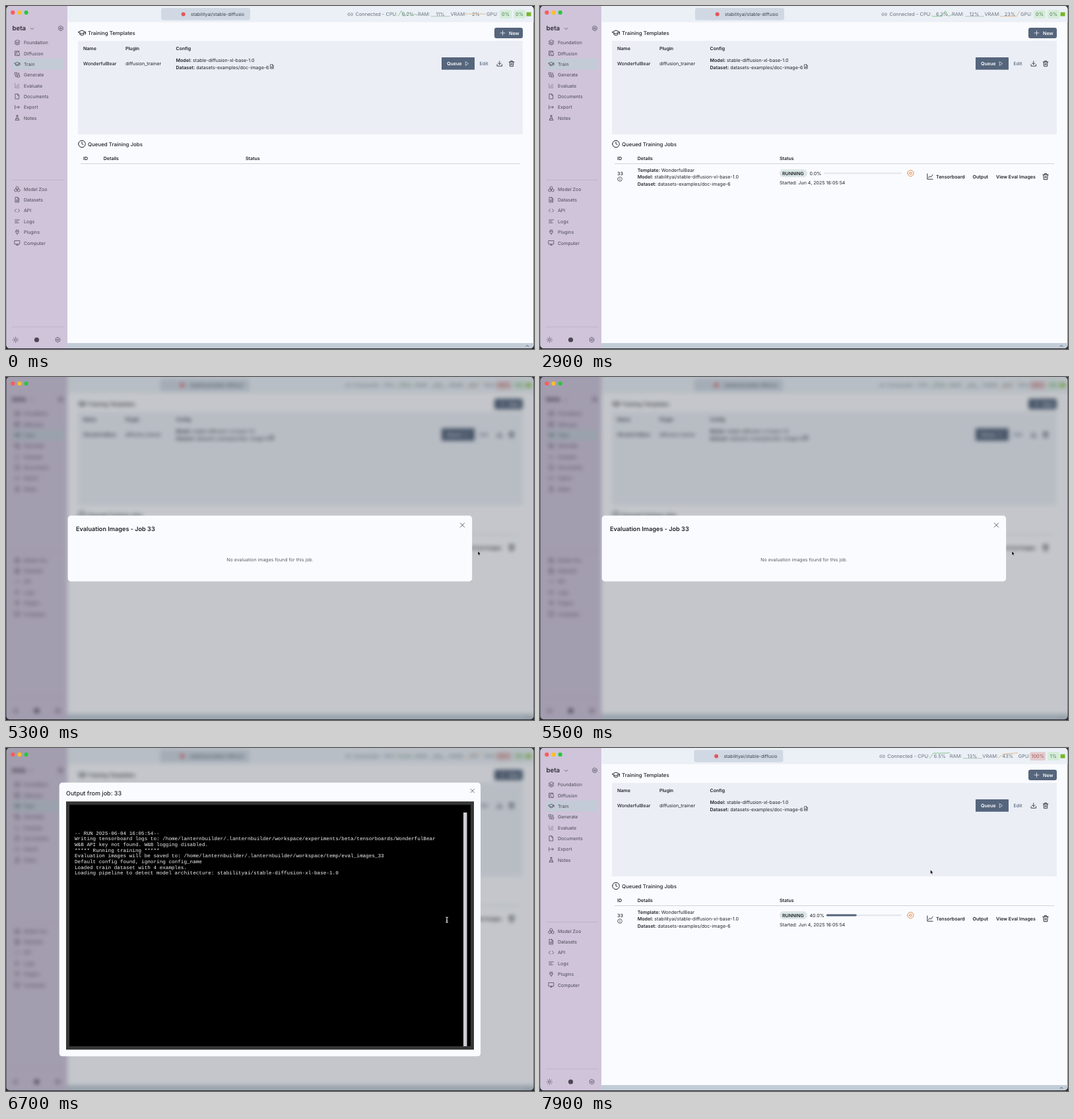
Write an HTML page that moves like this. It is 800 px wide and 521 px high and loops after 8 s.

```html
<!DOCTYPE html>
<html lang="en">
<head>
<meta charset="utf-8">
<style>
html, body { margin: 0; width: 100%; height: 100%; overflow: hidden; background: #2b2d31; }
svg { display: block; width: 100vw; height: 100vh; }
text { font-family: Inter, "Open Sans", sans-serif; white-space: pre; text-rendering: geometricPrecision; }
.mono { font-family: "Liberation Mono", monospace; }
.blur { filter: blur(3.1px); }
</style>
</head>
<body>
<svg id="stage" viewBox="0 0 800 521" xmlns="http://www.w3.org/2000/svg"></svg>
<script>
const INK = '#1f2328', SIDE = '#4b4754', SLATE = '#55657c', GREY = '#69717c', PAPER = '#fafbfe';

// y is the vertical middle of the capitals; *word* is semibold
const text = (x, y, s, { size = 7.1, weight = 400, fill = INK, more = '' } = {}) =>
  `<text x="${x}" y="${y + size * .36}" font-size="${size}" font-weight="${weight}" fill="${fill}" ${more}>` +
  s.replace(/\*(.+?)\*/g, '<tspan font-weight="600">$1</tspan>') + '</text>';
const rect = (x, y, w, h, fill, r = 0) =>
  `<rect x="${x}" y="${y}" width="${w}" height="${h}" rx="${r}" fill="${fill}"/>`;
const dot = (x, y, r, fill) => `<circle cx="${x}" cy="${y}" r="${r}" fill="${fill}"/>`;
const line = (x1, x2, y, color) => `<path d="M${x1} ${y}H${x2}" stroke="${color}" stroke-width=".8"/>`;
const ring = (x, y, r) => `M${x - r} ${y}a${r} ${r} 0 1 0 ${2 * r} 0a${r} ${r} 0 1 0 ${-2 * r} 0`;
// Icons are drawn on a 24 unit grid around their centre
const icon = (x, y, size, d, color = SIDE, width = 2) =>
  `<path transform="translate(${x - size / 2} ${y - size / 2}) scale(${size / 24})" d="${d}" fill="none"
    stroke="${color}" stroke-width="${width}" stroke-linecap="round" stroke-linejoin="round"/>`;

const I = {
  layers: 'M12 2L2 7l10 5 10-5zM2 12l10 5 10-5M2 17l10 5 10-5',
  image: 'M14 3H3v18h18V11M3 17l5-5 9 9M17 2v7M14 5h7' + ring(9, 8, 1.5),
  cap: 'M1 9l11-5 11 5-11 5zM6 12v5q6 4 12 0v-5M23 9v7',
  shapes: 'M3 3h8v8H3zM13 13h8v8h-8zM15 5h4v5M5 15v4h5',
  chart: 'M3 3v18h18M7 16l4-5 4 3 6-8',
  bars: 'M3 3v18h18M8 17v-4M13 17V8M18 17V5',
  file: 'M5 2h9l5 5v15H5zM14 2v6h5',
  doc: 'M5 2h9l5 5v15H5zM14 2v6h5M8 13h8M8 17h8',
  exit: 'M3 5v14M7 12h14M16 7l5 5-5 5',
  flask: 'M9 2h6M10 2v7L4 21h16L14 9V2M7 15h10',
  boxes: 'M12 2l5 3v5l-5 3-5-3V5zM6 12l5 3v5l-5 3-5-3v-5zM18 12l5 3v5l-5 3-5-3v-5z',
  code: 'M8 6l-6 6 6 6M16 6l6 6-6 6',
  lines: 'M3 6h18M3 12h11M3 18h15',
  plug: 'M9 2v6M15 2v6M6 8h12v4q0 5-6 5t-6-5zM12 17v5',
  screen: 'M2 3h20v14H2zM8 21h8M12 17v4',
  gear: 'M12 2l8.5 5v10L12 22l-8.5-5V7z' + ring(12, 12, 3.5),
  sun: ring(12, 12, 4.5) + 'M12 1v2M12 21v2M1 12h2M21 12h2M4 4l2 2M18 18l2 2M4 20l2-2M18 6l2-2',
  clock: ring(12, 12, 10.5) + 'M12 6v6l4 2',
  down: 'M6 9l6 6 6-6',
  up: 'M6 15l6-6 6 6',
  plus: 'M12 3v18M3 12h18',
  play: 'M6 3l13 9-13 9z',
  save: 'M3 15v6h18v-6M12 3v12M7 10l5 5 5-5',
  trash: 'M3 6h18M5 6l1 16h12l1-16M9 6V2h6v4M10 11v6M14 11v6',
  info: ring(12, 12, 10) + 'M12 11v6M12 7v.1',
  link: 'M9 17H7A5 5 0 0 1 7 7h2M15 7h2a5 5 0 0 1 0 10h-2M8 12h8',
  stop: ring(12, 12, 10.5) + ring(12, 12, 4),
  close: 'M3 3l18 18M21 3L3 21'
};

const menu = (y0, items) => items.map(([label, name], i) => {
  const y = y0 + i * 16.37;
  return icon(17, y, 9, I[name], label === 'Evaluate' ? '#8d8698' : SIDE) + text(27, y + .2, label, { size: 7, fill: SIDE });
}).join('');

const sidebar = rect(-12, -12, 105, 545, '#cfc4da') +
  text(9.5, 34, 'beta', { size: 9.6, weight: 600, fill: '#302c38' }) +
  icon(39.5, 34.5, 9, I.down) + icon(83, 34, 9, I.gear) +
  rect(9, 80, 79, 16.5, '#c2cbd6', 1) +
  menu(55.5, [['Foundation', 'layers'], ['Diffusion', 'image'], ['Train', 'cap'], ['Generate', 'shapes'],
    ['Evaluate', 'bars'], ['Documents', 'file'], ['Export', 'exit'], ['Notes', 'flask']]) +
  line(9, 88, 264.5, '#bbb1c6') +
  menu(278, [['Model Zoo', 'boxes'], ['Datasets', 'doc'], ['API', 'code'], ['Logs', 'lines'],
    ['Plugins', 'plug'], ['Computer', 'screen']]) +
  line(9, 88, 487.5, '#bbb1c6') +
  icon(14.5, 507, 9, I.sun) + dot(46.5, 507, 3.6, SIDE) + icon(78.5, 507, 9, I.gear);

const header = rect(93, -12, 720, 36.5, '#ebf0f6') +
  `<g id="pill">${rect(235, 3, 135, 18.5, '#d0d8e3', 3)}${dot(268.7, 12.5, 3, '#e0575b')}
  ${text(280, 12.7, 'stabilityai/stable-diffusio', { size: 6.95, fill: '#3a424c' })}</g><g id="stats"></g>`;

const templates = icon(115, 41, 12, I.cap, INK) +
  text(124, 41, 'Training Templates', { size: 7.9, weight: 500 }) +
  rect(740, 33, 43, 16, SLATE, 3) + icon(752.5, 41, 9, I.plus, '#fff') +
  text(762, 41.2, 'New', { weight: 600, fill: '#fff' }) +
  rect(109, 53, 674, 142, '#ebeef5', 1) +
  [[117, 'Name'], [181, 'Plugin'], [257.5, 'Config']].map(([x, s]) => text(x, 64.5, s, { size: 7, weight: 600 })).join('') +
  text(117, 87.5, 'WonderfulBear', { size: 7, weight: 500 }) +
  text(181, 87.8, 'diffusion_trainer') +
  text(257.5, 82.5, '*Model:* stable-diffusion-xl-base-1.0') +
  text(257.5, 93, '*Dataset:* datasets-examples/doc-image-6') + icon(403, 92, 7.5, I.doc, INK) +
  rect(660, 78, 50, 18.7, SLATE, .5) + text(668, 87.7, 'Queue', { weight: 600, fill: '#fff' }) +
  icon(698.5, 87.5, 7.5, I.play, '#fff') + text(717.5, 87.7, 'Edit', { weight: 500, fill: SLATE }) +
  icon(747.8, 87.5, 10, I.save, INK) + icon(766, 87.5, 10, I.trash, INK);

const jobs = icon(115, 209.5, 12, I.clock, INK) +
  text(124, 209.7, 'Queued Training Jobs', { size: 7.9, weight: 500 }) +
  [[117, 'ID'], [147.7, 'Details'], [363, 'Status']].map(([x, s]) => text(x, 231, s, { size: 7, weight: 600 })).join('') +
  line(113, 779, 239.5, '#c3cad3') +
  '<g id="job">' + text(117, 254, '33', { weight: 500 }) + icon(121, 263, 8, I.info, INK) +
  text(147.7, 249, '*Template:* WonderfulBear') +
  text(147.7, 259.7, '*Model:* stabilityai/stable-diffusion-xl-base-1.0') +
  text(147.7, 270.3, '*Dataset:* datasets-examples/doc-image-6') +
  rect(363, 248, 42, 12, '#dce7e6', 6) + text(367, 254.1, 'RUNNING', { size: 7, weight: 600 }) +
  '<g id="progress"></g>' + icon(561.5, 254, 10.5, I.stop, '#dc7a35') +
  text(363, 268.8, 'Started: Jun 4, 2025 16:05:54') +
  icon(591, 259, 11, I.chart, INK) +
  [[600, 'Tensorboard'], [655.5, 'Output'], [691, 'View Eval Images']].map(([x, s]) => text(x, 259.6, s, { weight: 600 })).join('') +
  icon(766, 259, 11, I.trash, INK) + '</g>';

const evalModal = rect(93.7, 210.6, 612.5, 99.8, PAPER, 4.5) +
  text(106, 231, 'Evaluation Images - Job 33', { size: 9.15, weight: 600 }) +
  icon(691.5, 225, 8.5, I.close, INK) +
  text(400, 277, 'No evaluation images found for this job.', { size: 7, fill: '#555e68', more: 'text-anchor="middle"' });

const home = '/home/lanternbuilder/.lanternbuilder/workspace';
const log = ['-- RUN 2025-06-04 16:05:54--',
  `Writing tensorboard logs to: ${home}/experiments/beta/tensorboards/WonderfulBear`,
  'W&amp;B API key not found. W&amp;B logging disabled.',
  '***** Running training *****',
  `Evaluation images will be saved to: ${home}/temp/eval_images_33`,
  'Default config found, ignoring config_name',
  'Loaded train dataset with 4 examples.',
  'Loading pipeline to detect model architecture: stabilityai/stable-diffusion-xl-base-1.0'];
const outputModal = rect(80.7, 52.6, 638.4, 415.6, PAPER, 4.5) +
  text(91, 69, 'Output from job: 33', { size: 9, weight: 500 }) +
  icon(706.7, 65, 7.5, I.close, INK) +
  rect(91, 81.2, 618, 377, '#363636') + rect(96, 86.3, 608, 366.7, '#000') + rect(693, 98, 5.5, 355, '#cdcdd2') +
  log.map((s, i) => `<text class="mono" x="104" y="${131.5 + i * 8.7}" font-size="7.66" fill="#f2f2f2">${s}</text>`).join('');

const stage = document.getElementById('stage');
stage.innerHTML = `<clipPath id="window">${rect(.6, 0, 798.8, 520, '#000', 5)}</clipPath>
<g clip-path="url(#window)">
  <g id="app">${rect(-12, -12, 824, 545, PAPER)}${header}${templates}${jobs}
    ${rect(93, 512, 720, 21, '#c3cdd7')}${icon(790, 516.3, 8, I.up, INK)}${sidebar}</g>
  <rect id="shade" width="800" height="521" fill="#222830" opacity=".25"/>
  ${dot(10.3, 9.9, 3.1, '#fb5d57')}${dot(20.5, 9.9, 3.1, '#fbbd2e')}${dot(30.6, 9.9, 3.1, '#2bc640')}
  <g id="evalModal">${evalModal}</g><g id="outputModal">${outputModal}</g>
</g>
<path id="arrow" d="M0 0V8.2L1.9 6.5 3.2 9.4 4.6 8.8 3.3 6H5.8Z" fill="#000" stroke="#fff" stroke-width=".6"/>
<path id="beam" d="M-1.8-4Q0-4 0-3Q0-4 1.8-4M0-3V3M-1.8 4Q0 4 0 3Q0 4 1.8 4M-1 1H1" fill="none" stroke="#eee" stroke-width="1.1"/>`;
const el = id => document.getElementById(id);
const show = (id, on) => el(id).setAttribute('display', on ? 'inline' : 'none');

// One reading per tick; the first six precede the start
const TICK = 950, SPAN = 6;
const cpu = [.1, .6, .1, .5, .15, .3, .2, 22, .6, 6.2, 6.3, 6.3, 6.3, 6.4, 6.5];
const vram = [2, 2, 2, 2, 2, 2, 2, 2, 2, 23, 36, 38, 39, 41, 43];

function spark(x, values, color) {
  const low = Math.min(...values), range = Math.max(...values) - low;
  const points = values.map((v, i) => `${x + i * 5},${range ? 15.7 - 8.2 * (v - low) / range : 12}`);
  return `<polyline points="${points.join(' ')}" fill="none" stroke="${color}" stroke-width=".9"/>`;
}

function badge(right, value) {
  const hot = value > 50, w = hot ? 23.5 : 18;
  return rect(right - w, 6, w, 13, hot ? '#e3cccf' : '#d6ecda', 2) +
    text(right - w / 2, 12.7, value + '%', { size: 7.4, fill: hot ? '#a35d60' : '#4d7f58', more: 'text-anchor="middle"' });
}

function stats(t) {
  const k = Math.floor(t / TICK) + SPAN, busy = t >= 5000;
  const recent = list => list.slice(k - SPAN, k + 1);
  const label = (x, s, anchor = 'start') => text(x, 12.7, s, { size: 7.4, fill: GREY, more: `text-anchor="${anchor}"` });
  const ram = k < 8 ? 11 : k < 10 ? 12 : 13;
  return `<g transform="translate(${busy ? -3.2 : 0} 0)">` +
    icon(521.7, 12.7, 9, I.link, GREY) + label(529.5, 'Connected -') + label(575.5, 'CPU:') +
    label(609, cpu[k].toFixed(1) + '%', 'middle') + label(624, 'RAM:') + label(658, ram + '%', 'middle') +
    label(673.5, 'VRAM:') + label(712, vram[k] + '%', 'middle') + label(728, 'GPU:') +
    spark(594, recent(cpu), '#7fc48a') + line(644, 673, 15.7, '#a3b9a9') + spark(697, recent(vram), '#e3b27d') + '</g>' +
    badge(766, busy ? 100 : 0) + badge(787, t >= 7600 ? 1 : 0) + rect(788.5, 9.5, 7, 6, '#76b82a');
}

function progress(t) {
  const p = t < 3300 ? 0 : t < 5400 ? 5 : t < 7400 ? 20 : 40;
  const x = p < 10 ? 430 : 434;
  return text(408.5, 254.1, p.toFixed(1) + '%') + rect(x, 252.7, 548 - x, 2.6, '#e5e9ef', 1.3) +
    rect(x, 252.5, (548 - x) * p / 100, 3, SLATE, p ? 1.3 : 0);
}

// time, x, y of the pointer
const path = [[4150, 742, 282], [4400, 715, 264.5], [5500, 715, 264.5], [5850, 690.5, 221.5], [6030, 690.5, 221.5],
  [6400, 668, 261], [6900, 668, 261], [7400, 706, 64], [7550, 706, 64], [7850, 591.5, 185]];
function pointer(t) {
  const i = path.findIndex(p => p[0] > t);
  if (i < 0) return path[path.length - 1].slice(1);
  const [a, b] = [path[i - 1], path[i]];
  const u = (t - a[0]) / (b[0] - a[0]), e = u * u * (3 - 2 * u);
  return [a[1] + (b[1] - a[1]) * e, a[2] + (b[2] - a[2]) * e];
}

function frame() {
  const t = Math.floor(performance.now() % 8000 / 100) * 100;
  const evalOpen = t >= 4500 && t < 5900, outputOpen = t >= 6500 && t < 7600;
  const modal = evalOpen || outputOpen;
  show('job', t >= 300);
  show('shade', modal);
  show('evalModal', evalOpen);
  show('outputModal', outputOpen);
  el('app').setAttribute('class', modal ? 'blur' : '');
  el('pill').setAttribute('transform', `translate(${t >= 5000 ? -1.6 : 0} 0)`);
  el('stats').innerHTML = stats(t);
  el('progress').innerHTML = progress(t);
  const visible = t >= 4200;
  const [x, y] = visible ? pointer(t) : [0, 0];
  const overLog = outputOpen && x < 693 && y > 86;
  show('arrow', visible && !overLog);
  show('beam', visible && overLog);
  el('arrow').setAttribute('transform', `translate(${x} ${y}) scale(.75)`);
  el('beam').setAttribute('transform', `translate(${x} ${y})`);
  requestAnimationFrame(frame);
}
frame();
</script>
</body>
</html>
```
